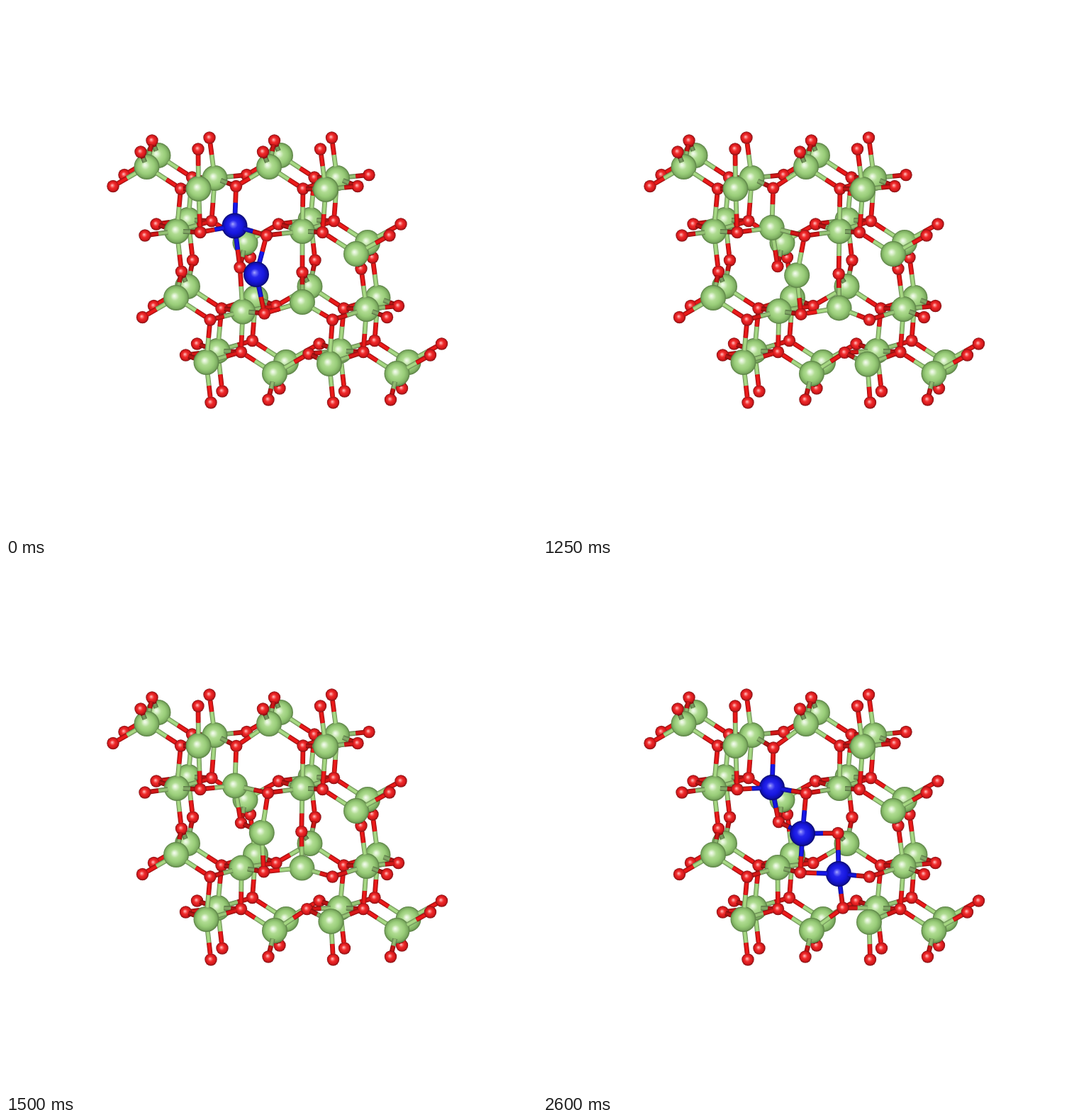
Recreate the animation shown at these times as an HTML page with a canvas. Size 749 px wide and 747 px high, loop 3 s.

```html
<!DOCTYPE html>
<html lang="en">
<head>
<meta charset="utf-8">
<title>Crystal defect migration</title>
<style>
  html, body { margin: 0; width: 100%; height: 100%; overflow: hidden; background: #fff; }
  canvas { display: block; }
</style>
</head>
<body>
<canvas id="stage" width="749" height="747"></canvas>
<script>
const ctx = document.getElementById("stage").getContext("2d");
const LOOP = 3000;
const STEP_STARTS = [0, 1000, 1250, 1500, 1750, 2000];
const LAST_STEP = STEP_STARTS.length - 1;
const BOND_LIMIT = 63.7;

// Stops run from the highlight to the rim.
const STYLES = {
  metal: { radius: 18, bond: [168, 218, 132],
    stops: [[0, "#f6fcf1"], [.14, "#def2d0"], [.34, "#b0dc92"], [.64, "#98cc78"], [.86, "#7eae62"], [1, "#587e42"]] },
  oxygen: { radius: 8.7, bond: [238, 26, 26],
    stops: [[0, "#ffcaca"], [.18, "#fb7c7c"], [.42, "#ee2b2b"], [.7, "#dc1b1e"], [.88, "#b01518"], [1, "#780e10"]] },
  marked: { radius: 18, bond: [24, 24, 240],
    stops: [[0, "#a8a8ff"], [.14, "#6868f8"], [.34, "#2626ec"], [.64, "#1717de"], [.86, "#1010ae"], [1, "#090968"]] }
};

// The lattice repeats sideways, diagonally (changing layer) and into the screen.
const COLUMN = 172.5;
const ROW = { x: 49.5, y: 177 };
const LAYER_SHIFT = 8;
const LAYER_DEPTH = 47.1;
const TILT = .18;

const CELL = [
  { kind: "metal", x: 198.5, y: 227, layer: 1, columns: 2, rows: 2 },
  { kind: "metal", x: 241, y: 318, layer: 1, columns: 2, rows: 2 },
  { kind: "metal", x: 278.5, y: 259, layer: 0, columns: 2, rows: 2 },
  { kind: "metal", x: 321.5, y: 350, layer: 0, columns: 2, rows: 2 },
  { kind: "oxygen", x: 190, y: 206, layer: 0, columns: 2, rows: 3 },
  { kind: "oxygen", x: 271, y: 202, layer: 0, columns: 2, rows: 3 },
  { kind: "oxygen", x: 151, y: 254.5, layer: 1, columns: 3, rows: 2 },
  { kind: "oxygen", x: 246.5, y: 258, layer: 1, columns: 2, rows: 2 },
  { kind: "oxygen", x: 196, y: 324, layer: 0, columns: 3, rows: 2 },
  { kind: "oxygen", x: 274, y: 319.5, layer: 0, columns: 2, rows: 2 }
];

// Sites left empty by the migrating metals: x, y, layer at start and end.
const VACANCIES = [[321.5, 350], [412.5, 412]];
const MIGRANTS = [
  { from: [322.5, 310.5, .7], to: [323, 317, .7], markedAt: [0, LAST_STEP] },
  { from: [353, 379, -.4], to: [366, 382, .15], markedAt: [0, LAST_STEP] },
  { from: [418, 418, 0], to: [417, 439, .6], markedAt: [LAST_STEP] }
];

// Offsets of lattice atoms strained by the defect.
const STRAINS = [
  { at: [278.5, 259], from: [-7, -1], to: [-7, -1] },
  { at: [323.5, 254.5], from: [1, 0], to: [1.5, 6.5] },
  { at: [368.5, 324], from: [-1, 0], to: [2.5, 1] },
  { at: [328.5, 371], from: [1.5, -2], to: [4, -5.5] },
  { at: [413.5, 318], from: [4.5, 0], to: [4.5, 0] },
  { at: [336, 428], from: [-2, 3.5], to: [-5, 2] },
  { at: [420, 375], from: [-2, 1], to: [-4, 6.5] },
  { at: [365, 439.5], from: [-.5, -5.5], to: [-2, -2.5] },
  { at: [426, 493], from: [1, -2], to: [-3, -6] },
  { at: [455, 503], from: [1, 2], to: [5, 4] }
];

const near = (site, [x, y]) => Math.hypot(site.x - x, site.y - y) < 3;
const mix = (from, to, t) => from.map((value, i) => value + (to[i] - value) * t);

function latticeSites() {
  const sites = [];
  for (const base of CELL)
    for (let column = 0; column < base.columns; column++)
      for (let row = 0; row < base.rows; row++)
        for (const back of [0, 2]) {
          const layer = (base.layer + row) % 2 + back;
          const shift = LAYER_SHIFT * (layer - base.layer);
          sites.push({
            kind: base.kind, layer,
            x: base.x + column * COLUMN + row * ROW.x + shift,
            y: base.y + row * ROW.y - shift
          });
        }
  return sites.filter(site => !VACANCIES.some(place => near(site, place)));
}

const SITES = latticeSites();

function makeAtom(x, y, layer, style) {
  return { x, y, z: layer * LAYER_DEPTH - TILT * (x - y), style: STYLES[style] };
}

function atomsAt(step) {
  const progress = step / LAST_STEP;
  const lattice = SITES.map(site => {
    const strain = STRAINS.find(({ at }) => near(site, at));
    const [dx, dy] = strain ? mix(strain.from, strain.to, progress) : [0, 0];
    return makeAtom(site.x + dx, site.y + dy, site.layer, site.kind);
  });
  const migrants = MIGRANTS.map(({ from, to, markedAt }) =>
    makeAtom(...mix(from, to, progress), markedAt.includes(step) ? "marked" : "metal"));
  return [...lattice, ...migrants];
}

function distance(a, b) {
  return Math.hypot(a.x - b.x, a.y - b.y, a.z - b.z);
}

function along(a, b, t) {
  return { x: a.x + (b.x - a.x) * t, y: a.y + (b.y - a.y) * t, z: a.z + (b.z - a.z) * t };
}

// Runs from an atom's surface to halfway between both surfaces.
function halfBond(atom, other) {
  const length = distance(atom, other);
  const start = along(atom, other, atom.style.radius * .94 / length);
  const end = along(atom, other, (length + atom.style.radius - other.style.radius) / 2 / length);
  const facing = Math.hypot(atom.x - other.x, atom.y - other.y) / length;
  return { z: (start.z + end.z) / 2, draw: () => drawRod(start, end, atom.style.bond, .5 + .5 * facing) };
}

function drawRod(start, end, color, light) {
  for (const [width, shade] of [[6.8, .66], [5.2, .86], [3.2, 1]]) {
    ctx.strokeStyle = `rgb(${color.map(c => Math.round(c * shade * light))})`;
    ctx.lineWidth = width;
    ctx.beginPath();
    ctx.moveTo(start.x, start.y);
    ctx.lineTo(end.x, end.y);
    ctx.stroke();
  }
}

function drawBall({ x, y, style: { radius, stops } }) {
  const fill = ctx.createRadialGradient(x - radius * .15, y - radius * .15, 0, x, y, radius);
  stops.forEach(stop => fill.addColorStop(...stop));
  ctx.fillStyle = fill;
  ctx.beginPath();
  ctx.arc(x, y, radius, 0, Math.PI * 2);
  ctx.fill();
}

function drawStep(step) {
  const atoms = atomsAt(step);
  const oxygens = atoms.filter(atom => atom.style === STYLES.oxygen);
  const metals = atoms.filter(atom => atom.style !== STYLES.oxygen);
  const parts = atoms.map(atom => ({ z: atom.z, draw: () => drawBall(atom) }));
  for (const metal of metals)
    for (const oxygen of oxygens)
      if (distance(metal, oxygen) < BOND_LIMIT) parts.push(halfBond(metal, oxygen), halfBond(oxygen, metal));
  ctx.fillStyle = "#fff";
  ctx.fillRect(0, 0, 749, 747);
  parts.sort((a, b) => b.z - a.z).forEach(part => part.draw());
}

let shown = -1;
const begin = performance.now();

function tick() {
  const time = (performance.now() - begin) % LOOP;
  const step = STEP_STARTS.findLastIndex(start => time >= start);
  if (step !== shown) drawStep(shown = step);
  requestAnimationFrame(tick);
}
tick();
</script>
</body>
</html>
```
